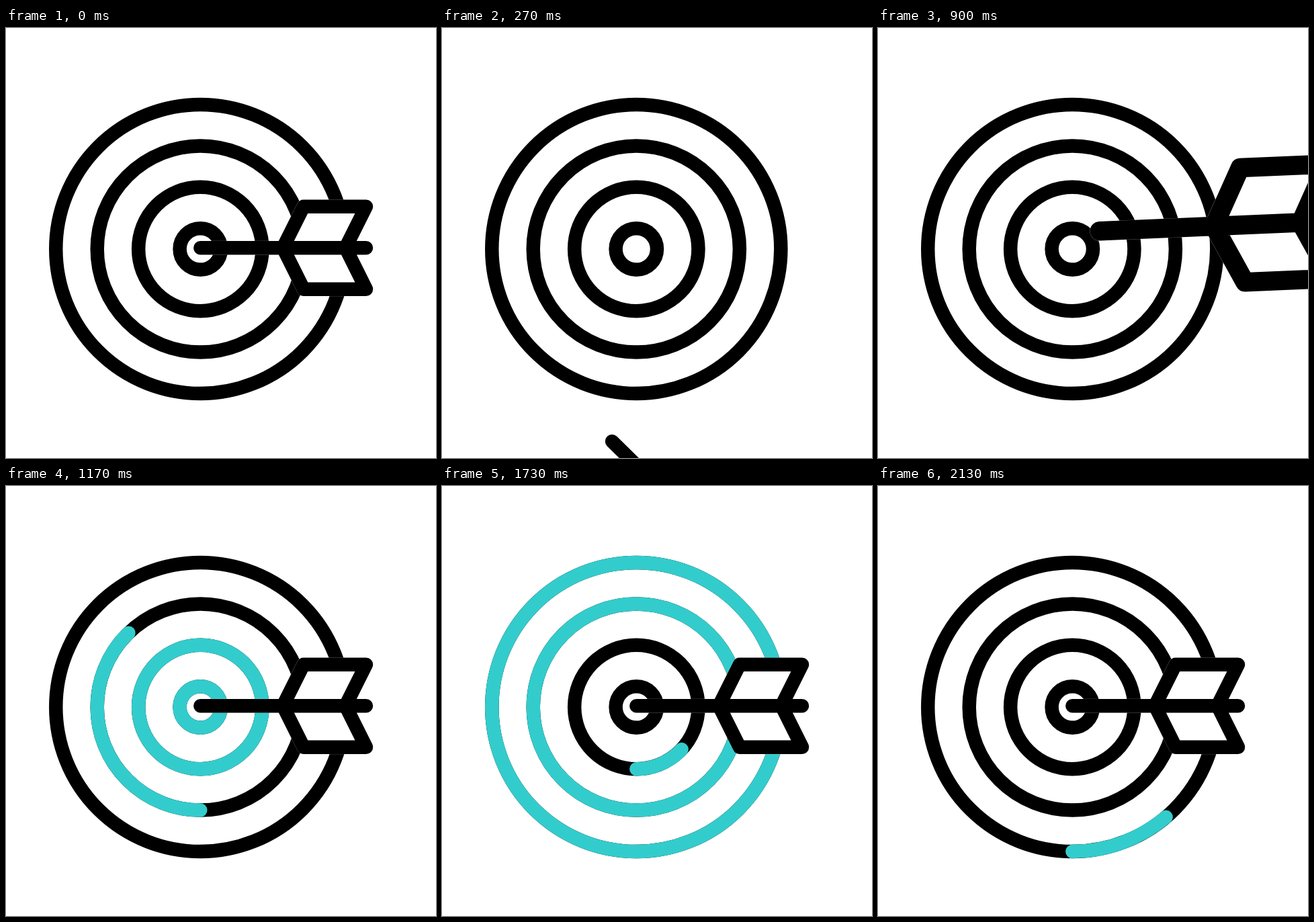
Write an HTML page with a canvas that moves like this. It is 640x640 px and loops after 2170 ms.

```html
<!DOCTYPE html>
<html lang="en">
<head>
<meta charset="utf-8">
<title>Target and arrow</title>
<style>
  html, body { margin: 0; width: 100%; height: 100%; overflow: hidden; background: #fff; }
  canvas { display: block; width: 640px; height: 640px; }
</style>
</head>
<body>
<canvas id="stage" width="640" height="640"></canvas>
<script>
const ctx = document.getElementById('stage').getContext('2d');
const LOOP = 2170, UNIT = 10.24, LINE = 2 * UNIT;
const BLACK = '#000', TEAL = '#33cccc';
const CENTER = { x: 289.3, y: 329 };
const TIP = { x: 289.3, y: 327.2 };
const LAND = 933, ENTER = 630;

// Radius, draw-on start and end, wipe-off start and end
const rings = [
  [3, 937, 1035, 1440, 1590],
  [9, 1035, 1133, 1590, 1751],
  [15, 1133, 1231, 1751, 1952],
  [21, 1231, 1329, 1952, 2152.5]
];

const progress = (t, a, b) => Math.min(1, Math.max(0, (t - a) / (b - a)));

function arc(radius, from, to, color) {
  ctx.beginPath();
  const turn = p => Math.PI * (0.5 + 2 * p);
  ctx.arc(CENTER.x, CENTER.y, radius * UNIT, turn(from), turn(to));
  ctx.strokeStyle = color;
  ctx.stroke();
}

function drawRings(t) {
  ctx.lineWidth = LINE;
  for (const [radius, on0, on1, off0, off1] of rings) {
    arc(radius, 0, 1, BLACK);
    const end = progress(t, on0, on1), start = progress(t, off0, off1);
    if (end > start) arc(radius, start, end, TEAL);
  }
}

// Arrow outline with its tip at the origin
const arrow = new Path2D('M0 0H246.7');
for (const side of [-1, 1]) {
  const y = side * 6 * UNIT;
  arrow.addPath(new Path2D(`M122.9 0L153.6 ${y}H246.7L216 0Z`));
}

function arrowPose(t) {
  if (t < 310) {
    const fall = (t / 130) ** 1.12;
    return { x: TIP.x - 16 * fall, y: TIP.y + 127 * fall, angle: 21.4 * t / 130, scale: 1 };
  }
  if (t < 610) return null;
  if (t >= LAND) return { ...TIP, angle: 0, scale: 1 };
  const dt = t - ENTER, left = (LAND - t) / (LAND - ENTER), u = 1 - left;
  return {
    x: TIP.x + 372 * left,
    y: 315 - 0.764 * dt + 0.002654 * dt * dt,
    angle: 72 * left ** 1.5 - 58 * u * u * left,
    scale: 1 + 3.55 * left
  };
}

function drawArrow(t) {
  const pose = arrowPose(t);
  if (!pose) return;
  ctx.save();
  ctx.translate(pose.x, pose.y);
  ctx.rotate(pose.angle * Math.PI / 180);
  ctx.scale(pose.scale, pose.scale);
  ctx.fillStyle = '#fff';
  ctx.fill(arrow);
  // Faint light seam where the arrow crosses the rings
  ctx.strokeStyle = 'rgba(255,255,255,.5)';
  ctx.lineWidth = LINE + 0.5;
  ctx.stroke(arrow);
  ctx.strokeStyle = BLACK;
  ctx.lineWidth = LINE;
  ctx.stroke(arrow);
  ctx.restore();
}

ctx.lineCap = ctx.lineJoin = 'round';
let origin;

function frame(now) {
  origin ??= now;
  const t = (now - origin) % LOOP;
  ctx.fillStyle = '#fff';
  ctx.fillRect(0, 0, 640, 640);
  drawRings(t);
  drawArrow(t);
  requestAnimationFrame(frame);
}
requestAnimationFrame(frame);
</script>
</body>
</html>
```
